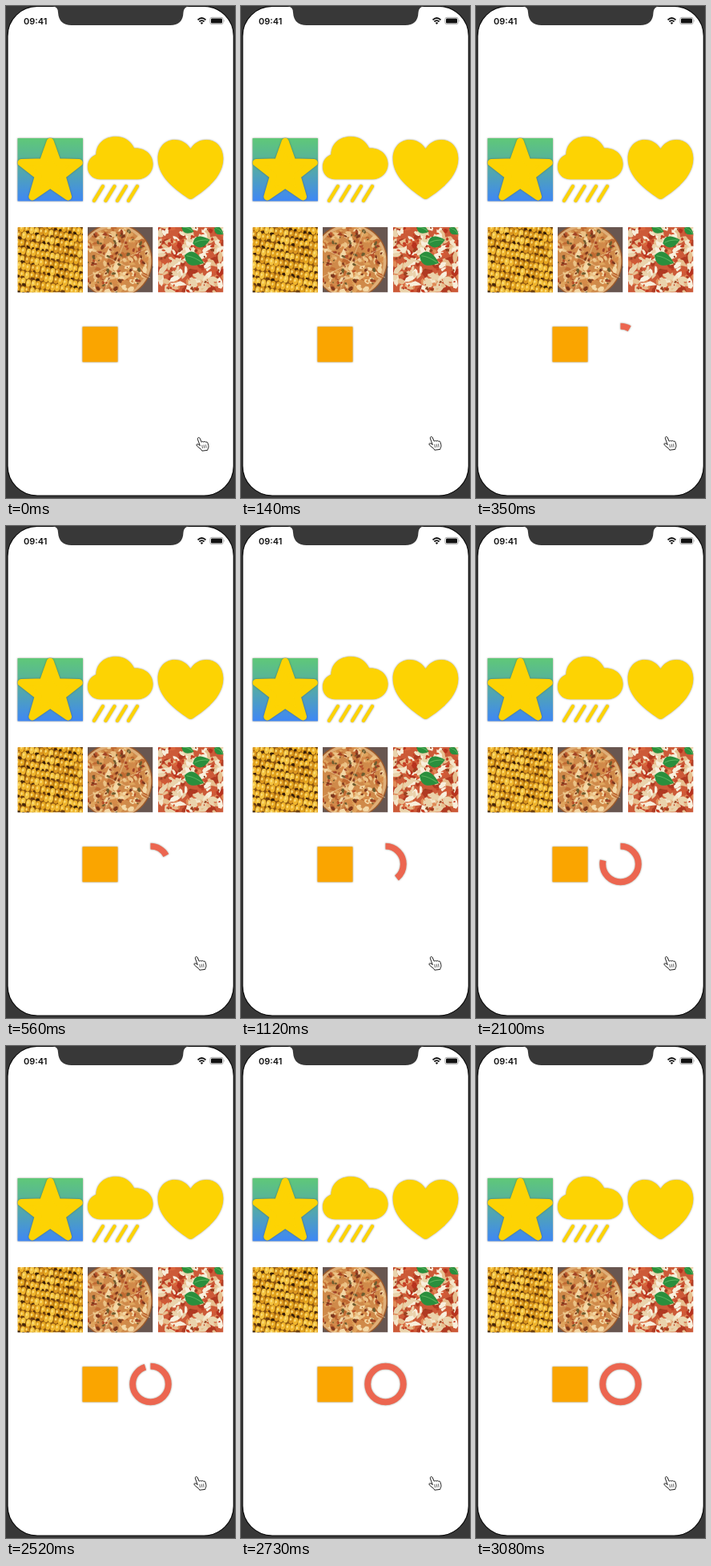
These frames come from a looping animation (286 by 614 pixels, 3150 ms). An HTML page:

```html
<!DOCTYPE html>
<html lang="en">
<head>
<meta charset="utf-8">
<title>Shapes and progress ring</title>
<style>
  html, body { margin: 0; width: 100%; height: 100%; overflow: hidden; background: #383838; }
  svg { display: block; width: 286px; height: 614px; }
  .clock { font: 600 11px Inter, "Liberation Sans", sans-serif; }
  .raised { filter: drop-shadow(.2px .4px 1px rgba(70, 65, 40, .55)); }
  .yellow { fill: #fdd303; stroke: #fdd303; stroke-linejoin: round; stroke-linecap: round; }
  .flat { stroke: none; }
  .line { fill: none; }
</style>
</head>
<body>
<svg viewBox="0 0 286 614">
  <defs>
    <linearGradient id="sky" x2="0" y2="1">
      <stop offset="0" stop-color="#5fc878"/>
      <stop offset=".5" stop-color="#53a9aa"/>
      <stop offset="1" stop-color="#3f87f5"/>
    </linearGradient>
    <filter id="soft" x="0" y="0" width="1" height="1"><feGaussianBlur stdDeviation=".4"/></filter>
    <clipPath id="tile"><rect width="81.5" height="81.5"/></clipPath>
  </defs>

  <!-- phone -->
  <rect width="286" height="614" fill="#383838"/>
  <rect x="2" y=".5" width="282.300" height="610.500" rx="37" fill="#fff" stroke="#0b0b0b" stroke-width="1.200"/>
  <path d="M58 0 Q65 1 65 8 Q66 24 82 24 H205 Q221 24 221.500 8 Q222 1 229 0Z" fill="#383838"/>

  <!-- status bar -->
  <text class="clock" x="22" y="23" fill="#111">09:41</text>
  <g fill="none" stroke="#111" stroke-width="1.800">
    <path d="M239.500 17.300 Q244.500 12.800 249.500 17.300"/>
    <path d="M241.400 19.500 Q244.500 16.800 247.600 19.500"/>
  </g>
  <path d="M242.700 21 Q244.500 19.600 246.300 21 L244.500 23Z" fill="#111"/>
  <rect x="254.800" y="14.300" width="16.400" height="8.400" rx="2.300" fill="none" stroke="#999" stroke-width=".8"/>
  <rect x="256" y="15.500" width="14" height="6" rx="1.300" fill="#111"/>
  <path d="M272 17 Q273.300 18.500 272 20Z" fill="#888"/>

  <!-- symbols -->
  <rect class="raised" x="14.500" y="165" width="81.500" height="78.500" fill="url(#sky)"/>
  <path id="star" class="yellow raised" stroke-width="9"/>
  <g class="raised">
    <path class="yellow flat" d="M118 216.300 C108 216.300 102 209.500 102 201 C102 193 106.500 187.500 112.500 185.500
      C112.500 172 123 163 137 163 C148 163 156.500 169 160 177.500 C174 176.500 183.500 186 183.500 197
      C183.500 208 175 216.300 164 216.300Z"/>
    <path class="yellow line" stroke-width="4.300"
      d="M121 225 L110 243 M135.500 225 L124.500 243 M150 225 L139 243 M164 225 L153 243"/>
  </g>
  <path class="yellow flat raised" d="M230.500 241 Q228.500 241 224 237.500 C204 224 189.700 209 189.700 190.500
    C189.700 176.500 198.500 167 210.500 167 C219.500 167 226.500 171.500 230.500 178.500
    C234.500 171.500 241.500 167 250.500 167 C262.500 167 271.300 176.500 271.300 190.500
    C271.300 209 257 224 237 237.500 Q232.500 241 230.500 241Z"/>

  <!-- pictures -->
  <g id="corn" transform="translate(14.500 276)" clip-path="url(#tile)"></g>
  <g id="pie" transform="translate(102 276)" clip-path="url(#tile)"></g>
  <g id="basil" transform="translate(190 276)" clip-path="url(#tile)"></g>

  <!-- square and ring -->
  <rect class="raised" x="95.500" y="400.300" width="44" height="44" fill="#faa500"/>
  <g class="raised">
    <circle id="ring" cx="180.500" cy="422" r="22.300" fill="none" stroke="#ec6650" stroke-width="7.800"
      pathLength="360" transform="rotate(-90 180.500 422)"/>
  </g>

  <!-- pointer -->
  <g id="hand" fill="#fff" stroke="#222" stroke-linejoin="round" stroke-linecap="round">
    <path d="M4.600 10.200 L1.900 2.800 Q1.500 .8 2.900 .5 Q4.200 .3 4.900 2 L6.700 6.200
      Q8 4.900 9.300 6 Q10.800 4.900 12 6.200 Q13.700 5.400 14.400 7.200 L15.400 10.700
      Q15.800 12.800 14.800 14.300 L14.100 16.400 L7.300 17.200 L6.400 15.600 L.9 11
      Q-.1 9.600 1 8.800 Q2.400 8.400 4.600 10.200Z"/>
    <path d="M7.300 10.300 L8 13.700 M9.700 10 L10.300 13.500 M12 9.800 L12.600 13.200" stroke-width=".7"/>
  </g>
</svg>
<script>
  const LOOP = 3150, STEP = 70;
  const RING_START = 140, RING_TIME = 2500;
  const byId = id => document.getElementById(id);
  const clamp = v => Math.min(1, Math.max(0, v));

  let seed = 41;
  const rand = (lo = 0, hi = 1) => {
    seed = (seed * 16807) % 2147483647;
    return lo + (hi - lo) * seed / 2147483647;
  };
  const pick = list => list[Math.floor(rand(0, list.length))];

  const ellipse = (x, y, rx, ry, turn, fill) =>
    `<ellipse rx="${rx.toFixed(2)}" ry="${ry.toFixed(2)}" fill="${fill}"
      transform="translate(${x.toFixed(2)} ${y.toFixed(2)}) rotate(${turn.toFixed(0)})"/>`;

  const base = fill => `<rect width="81.5" height="81.5" fill="${fill}"/>`;

  // An irregular flake, longer along its own axis.
  function chunk(x, y, r, fill, long) {
    const pts = Array.from({ length: 7 }, (_, i) => {
      const a = i * Math.PI * 2 / 7, d = r * rand(.6, 1.2);
      return `${(d * long * Math.cos(a)).toFixed(1)},${(d * Math.sin(a)).toFixed(1)}`;
    });
    return `<polygon points="${pts.join(' ')}" fill="${fill}"
      transform="translate(${x.toFixed(1)} ${y.toFixed(1)}) rotate(${rand(0, 180).toFixed(0)})"/>`;
  }

  function scatter(n, lo, hi, colors, inside = () => true, long = 1.4) {
    let out = '';
    for (let i = 0; i < n; i++) {
      const x = rand(0, 82), y = rand(0, 82), r = rand(lo, hi), color = pick(colors);
      if (inside(x, y)) out += chunk(x, y, r, color, long);
    }
    return out;
  }

  const blurred = parts => `<g filter="url(#soft)">${parts}</g>`;

  function cornPicture() {
    let out = base('#8d5610');
    for (let row = -2; row < 10; row++) {
      for (let col = -1; col < 15; col++) {
        const x = col * 6 + (row % 2) * 1.5 + rand(-.6, .6);
        const y = row * 9.6 + col * 1.1 + rand(-.6, .6);
        out += ellipse(x, y, 3, 4.7, 12, pick(['#f0b52c', '#e5a51f', '#f4c440', '#d9951d']));
        out += ellipse(x - .5, y - .8, 1.2, 1.7, 12, '#fadb77');
        if (rand() < .5) {
          out += ellipse(x + 1, y + 4, rand(1.5, 3.4), rand(1.2, 2.3), rand(-10, 40), pick(['#4b290b', '#6b3d0e', '#392009']));
        }
      }
    }
    return blurred(out);
  }

  function piePicture() {
    const cx = 34, cy = 42;
    const inside = (x, y) => Math.hypot(x - cx, y - cy) < 42;
    let out = base('#685650') + scatter(25, 2, 5, ['#7a655c', '#554641', '#8b7568']);
    out += ellipse(cx, cy, 47, 47, 0, '#9c5a2b') + ellipse(cx, cy, 45.5, 45.5, 0, '#deae78');
    out += ellipse(cx, cy, 42, 42, 0, '#cf8a4a');
    out += scatter(260, 1.2, 3.6, ['#ebc286', '#d68b49', '#c06a32', '#f3d8a6', '#dea35d'], inside, 1.8);
    out += scatter(130, .8, 2.3, ['#a14325', '#7d371d', '#b8522b', '#6d5c2f'], inside, 1.6);
    out += '<path d="M-2 25 L78 63 M20 82 L52 4 M-2 63 L72 27" stroke="#f3d6a4" opacity=".6"/>';
    return blurred(out);
  }

  function leaf(x, y, size, turn) {
    const s = size, w = size * .75;
    return `<g transform="translate(${x} ${y}) rotate(${turn})">
      <path d="M${-s} 0 Q${-s * .5} ${-w * 1.7} ${s} 0 Q${-s * .3} ${w * 1.7} ${-s} 0Z" fill="#2a8f3d"/>
      <path d="M${-s * .8} -.5 Q0 -3 ${s * .8} 0" fill="none" stroke="#5cb35f"/></g>`;
  }

  function basilPicture() {
    let out = base('#cc5a38');
    out += scatter(90, 2, 5, ['#b8321e', '#d9663e', '#e08a57', '#b03a22']);
    out += scatter(115, 2, 4.4, ['#f3e5c9', '#ead3ac', '#f8efdc', '#e7bf8f'], undefined, 2);
    out += scatter(70, .8, 2.2, ['#c53d23', '#d75a35', '#97421f']);
    out += leaf(37, 3, 8, 20) + leaf(54, 18, 11, -12) + leaf(45, 40, 13, 22) + leaf(76, 5, 7, 35);
    return blurred(out);
  }

  byId('corn').innerHTML = cornPicture();
  byId('pie').innerHTML = piePicture();
  byId('basil').innerHTML = basilPicture();

  const starPoints = Array.from({ length: 10 }, (_, i) => {
    const r = i % 2 ? 15.5 : 38, a = i * Math.PI / 5;
    return `${(55.2 + r * Math.sin(a)).toFixed(2)} ${(207.3 - r * Math.cos(a)).toFixed(2)}`;
  });
  byId('star').setAttribute('d', `M${starPoints.join('L')}Z`);

  const ring = byId('ring'), hand = byId('hand');

  function draw(now) {
    const t = Math.floor((now % LOOP) / STEP) * STEP;
    const angle = 360 * clamp((t - RING_START) / RING_TIME);
    ring.style.visibility = angle > 0 ? 'visible' : 'hidden';
    ring.setAttribute('stroke-dasharray', angle < 360 ? `${angle} 400` : 'none');

    const slide = clamp(t / 140);
    hand.setAttribute('transform', `translate(${237.5 - 3 * slide} ${538 - slide})`);
  }

  const start = performance.now();
  function tick() {
    draw(performance.now() - start);
    requestAnimationFrame(tick);
  }
  tick();
</script>
</body>
</html>
```
